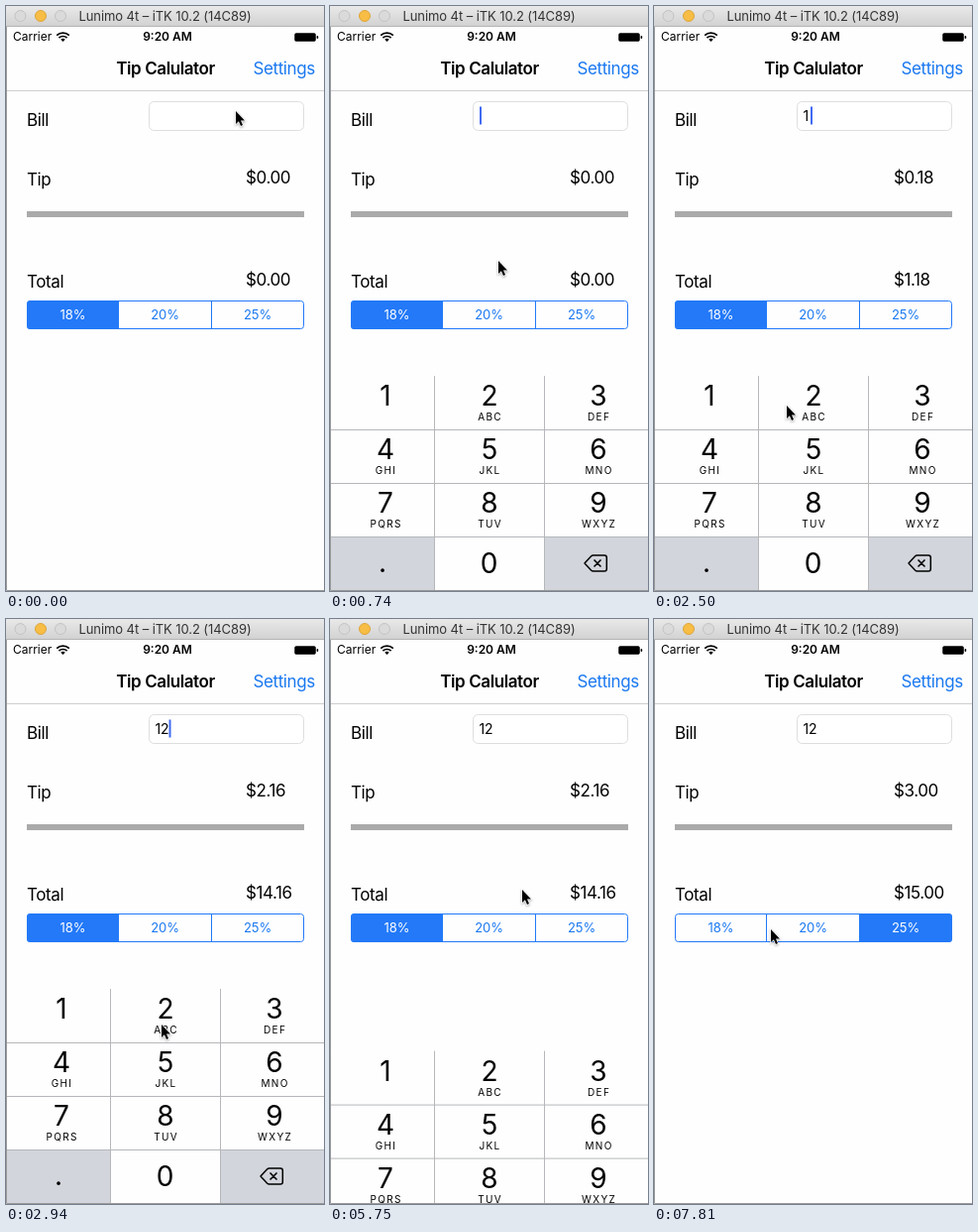
Write an HTML page that moves like this. It is 321 by 590 pixels and loops after 8 s.

```html
<!DOCTYPE html>
<html lang="en">
<head>
<meta charset="utf-8">
<title>Tip calculator</title>
<style>
  html, body { margin: 0; width: 100%; height: 100%; overflow: hidden; background: #fefefe; }
  svg { display: block; font: 17px Inter, Roboto, sans-serif; letter-spacing: -.41px; }
  .mid { text-anchor: middle; }
  .blue { fill: #1a78f0; }
  .small { font-size: 13px; letter-spacing: -.08px; }
  .status { font-size: 12px; letter-spacing: 0; }
  .digit { font-size: 28px; letter-spacing: 0; }
  .letters { font-size: 10px; letter-spacing: 1.3px; }
  #pointer { filter: drop-shadow(0 1px 1px #0005); }
</style>
</head>
<body>
<svg id="stage" width="321" height="590" viewBox="0 0 321 590">
  <defs>
    <linearGradient id="bar" x2="0" y2="1">
      <stop stop-color="#e9e9e9"/><stop offset="1" stop-color="#d2d2d2"/>
    </linearGradient>
    <clipPath id="pill"><rect x="21" y="297" width="280" height="29" rx="3.5"/></clipPath>
  </defs>
  <rect width="321" height="590" fill="#fefefe"/>

  <!-- window bar -->
  <rect width="321" height="20" fill="url(#bar)"/>
  <rect y="20" width="321" height="1" fill="#b4b4b4"/>
  <g fill="#dadada" stroke="#c3c3c3">
    <circle cx="14.5" cy="10" r="5.5"/>
    <circle cx="35" cy="10" r="5.5" fill="#f7bd45" stroke="#dfa53a"/>
    <circle cx="55" cy="10" r="5.5"/>
  </g>
  <text class="mid small" x="160.5" y="15" fill="#333">Lunimo 4t – iTK 10.2 (14C89)</text>

  <!-- status bar -->
  <text class="status" x="7" y="35">Carrier</text>
  <g fill="none" stroke="#000" stroke-width="1.7">
    <path d="M51.2 29.6a9 9 0 0 1 12.6 0M53.4 32.2a5.8 5.8 0 0 1 8.2 0"/>
    <path d="M57.5 36l-2.2-2.3a3.2 3.2 0 0 1 4.4 0z" fill="#000" stroke="none"/>
  </g>
  <text class="mid status" x="163" y="35" font-weight="600">9:20 AM</text>
  <rect x="291.5" y="27.5" width="21" height="8" rx="1.5" stroke="#000" stroke-opacity=".5"/>
  <rect x="313.6" y="30" width="1.6" height="3" rx=".8"/>

  <!-- page -->
  <text class="mid" x="161" y="69" font-weight="600">Tip Calulator</text>
  <text class="blue" x="249.5" y="69">Settings</text>
  <rect y="85" width="321" height="1" fill="#cfcfd2"/>
  <text x="21" y="121">Bill</text>
  <rect x="144.5" y="96.5" width="156" height="29" rx="5" fill="#fff" stroke="#dedede"/>
  <text id="bill" x="150.5" y="116" style="font-size:14px;letter-spacing:-.15px"></text>
  <rect id="caret" y="101.5" width="2" height="18" fill="#426bf2"/>
  <text x="21" y="181">Tip</text>
  <text id="tip" x="242" y="179"></text>
  <rect x="21" y="207" width="280" height="6" fill="#aaa"/>
  <text x="21" y="284">Total</text>
  <text id="total" x="242" y="282"></text>

  <g id="segments" clip-path="url(#pill)"></g>
  <path d="M113.5 297v29M207.5 297v29" stroke="#2379f8"/>
  <rect x="21.5" y="297.5" width="279" height="28" rx="3" fill="none" stroke="#2379f8"/>

  <g id="keyboard"></g>
  <path d="M.5 21V589.5H321" fill="none" stroke="#9b9b9b"/>
  <path id="pointer" d="M1 1V14L3.900 11.300L6 16L8 15.100L6 10.500H10Z"
        stroke="#fff" stroke-width="1.4" paint-order="stroke"/>
</svg>
<script>
const $ = id => document.getElementById(id);
const clamp = v => Math.max(0, Math.min(1, v));
const easeOut = v => 1 - (1 - clamp(v)) ** 3;

const LOOP = 8000, START = 300, STEP = 147.25;   // screen refreshes in even ticks
const FOCUS = 260, BLUR = 5700;
const KEYS = [{ key: 1, down: 2060, up: 2200 }, { key: 2, down: 2790, up: 2930 }];
const RATES = [18, 20, 25], TAPS = [-1000, 6490, 7230];
const EDGES = [21, 114, 207, 301];

// time, x, y
const PATH = [
  [300, 231, 105], [741, 169, 256], [1330, 112, 372], [1800, 87, 390], [2230, 87, 390],
  [2650, 156, 408], [3840, 156, 408], [4423, 171, 308], [4750, 190, 281], [5010, 195, 285],
  [5160, 195, 285], [5450, 193, 272], [5760, 193, 272], [6340, 165, 310], [6790, 165, 310],
  [7080, 245, 318], [7370, 250, 316], [7600, 185, 328], [7809, 117, 312]
];

// segmented control
$('segments').innerHTML = RATES.map((rate, i) => {
  const x = EDGES[i], w = EDGES[i + 1] - x;
  return `<rect id="seg${i}" x="${x}" y="297" width="${w}" height="29" fill="#2379f8"/>
    <text id="rate${i}" class="mid small" x="${x + w / 2}" y="316">${rate}%</text>`;
}).join('');

// number pad
const COLS = [1, 106, 217, 321], CENTERS = [56, 161, 271];
const LETTERS = ['', 'ABC', 'DEF', 'GHI', 'JKL', 'MNO', 'PQRS', 'TUV', 'WXYZ'];
const keyRect = (id, col, row, fill) =>
  `<rect id="key${id}" x="${COLS[col]}" y="${373 + 54 * row}" width="${COLS[col + 1] - COLS[col]}" height="54" fill="${fill}"/>`;
$('keyboard').innerHTML =
  LETTERS.map((letters, i) => {
    const col = i % 3, row = Math.floor(i / 3), x = CENTERS[col], y = 54 * row;
    return keyRect(i + 1, col, row, '#fefefe') +
      `<text class="mid digit" x="${x}" y="${403 + y}">${i + 1}</text>
       <text class="mid letters" x="${x + .6}" y="${418 + y}">${letters}</text>`;
  }).join('') +
  keyRect('Dot', 0, 3, '#d2d5db') + keyRect(0, 1, 3, '#fefefe') + keyRect('Del', 2, 3, '#d2d5db') +
  `<text class="mid digit" x="53" y="571">.</text>
   <text class="mid digit" x="160.5" y="572">0</text>
   <path d="M1 427.5H321M1 481.5H321M1 535.5H321M105.5 373V590M216.5 373V590" stroke="#b5b7bb"/>
   <path d="M257 562l6.5-7q1-1 2.3-1H277q2.3 0 2.3 2.3v11.4q0 2.3-2.3 2.3H265.8q-1.3 0-2.3-1ZM266.5 558.5l7 7M273.5 558.5l-7 7"
     fill="none" stroke="#000" stroke-width="1.5" stroke-linejoin="round"/>`;

function pointerAt(t) {
  const i = PATH.findIndex(p => p[0] > t);
  if (i === 0) return PATH[0].slice(1);
  if (i < 0) return PATH[PATH.length - 1].slice(1);
  const [a, b] = [PATH[i - 1], PATH[i]], u = (t - a[0]) / (b[0] - a[0]);
  return [1, 2].map(n => a[n] + (b[n] - a[n]) * u);
}

const money = v => '$' + v.toFixed(2);

function draw(t) {
  const typed = KEYS.filter(k => t >= k.up);
  const bill = typed.map(k => k.key).join('');
  const selected = TAPS.filter(tap => t >= tap).length - 1;
  const tip = bill * RATES[selected] / 100;
  $('bill').textContent = bill;
  $('tip').textContent = money(tip);
  $('total').textContent = money(+bill + tip);

  const lastInput = typed.length ? typed[typed.length - 1].up : FOCUS;
  const blink = (t - lastInput) % 950;
  $('caret').setAttribute('x', [151, 158, 164.5][bill.length]);
  $('caret').setAttribute('opacity', t < FOCUS || t >= BLUR ? 0 : clamp((622 - blink) / 30));

  const fade = clamp((t - TAPS[selected]) / 150);
  RATES.forEach((_, i) => {
    const on = i === selected ? fade : i === selected - 1 ? 1 - fade : 0;
    $('seg' + i).setAttribute('opacity', on);
    $('rate' + i).setAttribute('fill', on > .5 ? '#fff' : '#1a78f0');
  });

  for (const k of KEYS)
    $('key' + k.key).setAttribute('fill', t >= k.down && t < k.up ? '#d2d5db' : '#fefefe');
  const shown = easeOut((t - FOCUS) / 440) - easeOut((t - BLUR) / 450);
  $('keyboard').setAttribute('transform', `translate(0 ${217 * (1 - shown)})`);
  $('pointer').setAttribute('transform', `translate(${pointerAt(t).map(Math.round)})`);
}

function frame() {
  const t = performance.now() % LOOP;
  const tick = Math.floor((t - START + 12) / STEP);
  draw(tick < 0 ? 0 : START + tick * STEP);
  requestAnimationFrame(frame);
}
frame();
</script>
</body>
</html>
```
